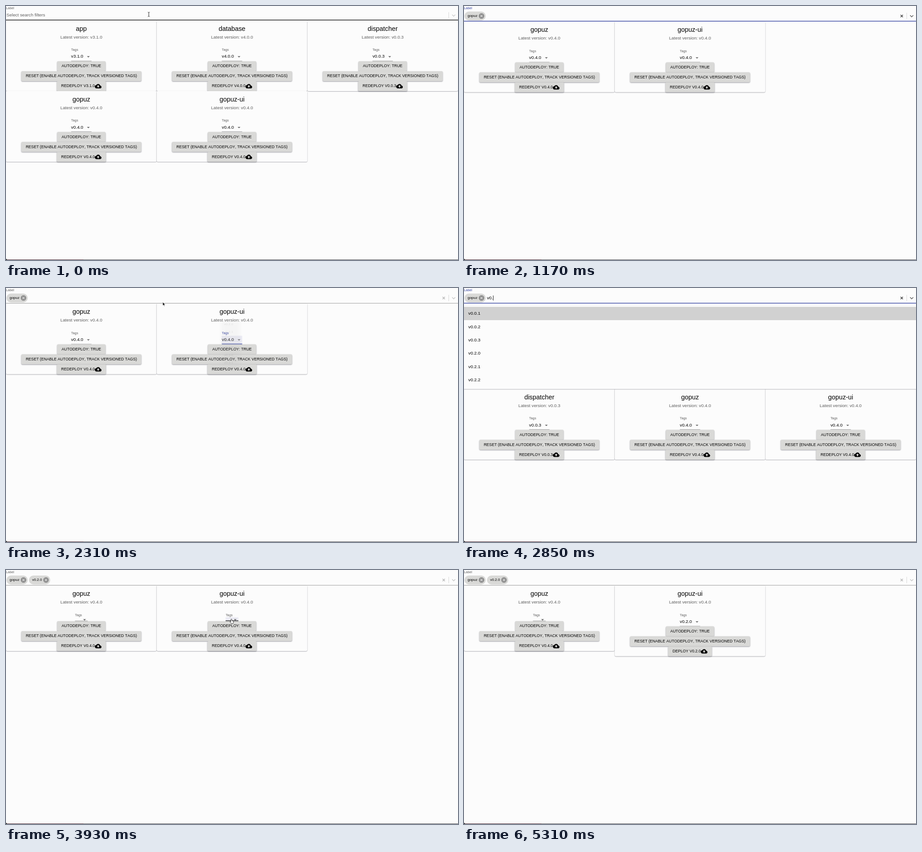
These frames come from a looping animation (998x561 px, 5.34 s). An HTML page with a canvas:

```html
<!DOCTYPE html>
<html lang="en">
<head>
<meta charset="utf-8">
<style>
html, body { margin: 0; width: 100%; height: 100%; overflow: hidden; background: #fcfcfc; }
canvas { display: block; }
</style>
</head>
<body>
<canvas id="stage" width="998" height="561"></canvas>
<script>
const ctx = document.getElementById('stage').getContext('2d');
const LOOP = 5340, COL = 998 / 3, ROW = 29.4;
const BG = '#fcfcfc', INK = '#000', GREY = '#5e5e5e', BLUE = '#303f9f', FILL = '#d9d9d7';
const cloud = new Path2D('M19.35 10.04C18.67 6.59 15.64 4 12 4 9.11 4 6.6 5.64 5.35 8.04 2.34 8.36 0 10.91 0 14c0 3.31 2.69 6 6 6h13c2.76 0 5-2.24 5-5 0-2.64-2.05-4.78-4.65-4.96zM14 13v4h-4v-4H7l5-5 5 5h-3z');

const tags = ['v0.2.0', 'v0.2.1', 'v0.4.0', 'v0.2.2', 'v0.3.0', 'v0.3.1'];
const services = [
  { name: 'app', latest: 'v3.1.0', tags: ['v3.1.0'] },
  { name: 'database', latest: 'v4.0.0', tags: ['v4.0.0'] },
  { name: 'dispatcher', latest: 'v0.0.3', tags: ['v0.0.1', 'v0.0.2', 'v0.0.3'] },
  { name: 'gopuz', latest: 'v0.4.0', tags },
  { name: 'gopuz-ui', latest: 'v0.4.0', tags }
];
const options = [...services.map(s => s.name), 'add-zt',
  'v0.0.1', 'v0.0.2', 'v0.0.3', 'v0.2.0', 'v0.2.1', 'v0.2.2', 'v0.3.0', 'v0.3.1', 'v0.4.0', 'v3.1.0', 'v4.0.0'];

// Pointer paths: [time, x, y]
const paths = [
  [[0, 315.3, 18.5], [540, 315.3, 18.5]],
  [[1440, 340, 60], [1680, 498, 113], [2190, 498, 113], [2310, 346.5, 31], [2400, 300, 22], [2580, 300, 22]],
  [[3570, 300, 22], [3810, 498, 109], [4380, 498, 109], [4650, 500, 117], [4980, 560, 200], [5190, 636, 260]]
];

const clamp = v => Math.max(0, Math.min(1, v));
const between = (t, a, b) => t >= a && t < b;
const fade = (t, inAt, outAt) => Math.min(clamp((t - inAt) / 90), clamp(1 - (t - outAt) / 100));
const typed = (t, word, times) => word.slice(0, times.filter(k => t >= k).length);

function setFont(size, kerning) {
  ctx.font = size + 'px "Liberation Sans", Helvetica, Arial, sans-serif';
  ctx.fontKerning = kerning;
}

function text(str, x, y, size, color = INK, align = 'left', kerning = 'normal') {
  setFont(size, kerning);
  ctx.textAlign = align;
  ctx.textBaseline = 'middle';
  ctx.fillStyle = color;
  ctx.fillText(str, x, y);
  return ctx.measureText(str).width;
}

function rect(x, y, w, h, color) {
  ctx.fillStyle = color;
  ctx.fillRect(x, y, w, h);
}

function panel(x, y, w, h, r, color, shade = 0, drop = 1, blur = 2.2) {
  ctx.save();
  if (shade) {
    ctx.shadowColor = `rgba(0,0,20,${shade})`;
    ctx.shadowBlur = blur;
    ctx.shadowOffsetY = drop;
  }
  ctx.fillStyle = color;
  ctx.beginPath();
  ctx.roundRect(x, y, w, h, r);
  ctx.fill();
  ctx.restore();
}

function line(points, color, width) {
  ctx.strokeStyle = color;
  ctx.lineWidth = width;
  ctx.beginPath();
  points.forEach(p => ctx.lineTo(...p));
  ctx.stroke();
}

function cross(x, y, r, color, width) {
  line([[x - r, y - r], [x + r, y + r]], color, width);
  line([[x - r, y + r], [x + r, y - r]], color, width);
}

function polygon(points, color, outline) {
  ctx.beginPath();
  points.forEach(p => ctx.lineTo(...p));
  ctx.closePath();
  ctx.fillStyle = color;
  ctx.fill();
  if (outline) {
    ctx.strokeStyle = outline;
    ctx.lineWidth = 0.8;
    ctx.stroke();
  }
}

function button(label, cx, y, icon) {
  setFont(8.65, 'none');
  const w = ctx.measureText(label).width + (icon ? 14.7 : 0) + 19.6, x = cx - w / 2;
  panel(x, y, w, 22, 2.4, FILL, 0.4);
  text(label, x + 9.8, y + 11, 8.65, INK, 'left', 'none');
  if (icon) {
    ctx.save();
    ctx.translate(x + w - 24.5, y + 3.6);
    ctx.scale(0.6125, 0.6125);
    ctx.fillStyle = '#000';
    ctx.fill(cloud);
    ctx.restore();
  }
}

function card(s, x, y, value, select) {
  const cx = x + COL / 2, w = value ? 45 : 28.2, left = cx - w / 2;
  const lift = value ? 0 : 11.5, base = y + 90.2 - lift, mid = y + 79.9 - lift * 0.4;
  panel(x + 0.1, y, COL - 0.2, 156.2 - lift, 2.4, BG, 0.4, 0.7, 1.6);
  text(s.name, cx, y + 19, 14.4, INK, 'center');
  text('Latest version: ' + s.latest, cx, y + 37.2, 9.75, GREY, 'center');
  if (select) panel(left, base - 19 + lift * 0.9, w, 19 - lift * 0.9, 1, '#ebebf4');
  text('Tags', left, y + 65.3, 7.35, select === 'focus' ? BLUE : GREY);
  if (value) text(value, left, mid, 9.8);
  const ax = left + w - 7, ay = mid - 1;
  polygon([[ax - 3.1, ay], [ax + 3.1, ay], [ax, ay + 3.1]], '#686868');
  const thick = select ? 1.4 : 0.8;
  rect(left, base - thick - 0.1, w, thick, select === 'focus' ? BLUE : select ? '#222' : '#8c8c8c');
  button('AUTODEPLOY: TRUE', cx, base);
  button('RESET (ENABLE AUTODEPLOY, TRACK VERSIONED TAGS)', cx, base + 22.1);
  const current = value || s.latest;
  button((current === s.latest ? 'REDEPLOY ' : 'DEPLOY ') + current.toUpperCase(), cx, base + 44.1, true);
}

function searchBar(s, lineY) {
  const mid = lineY - (s.chips.length ? 11.5 : 10.4);
  const strong = s.focus ? '#555' : '#c4c4c4';
  text('Label', 0, 4.7, 7.35, s.focus ? BLUE : GREY);
  let x = 1;
  for (const chip of s.chips) {
    panel(x, mid - 9.8, 47, 19.6, 9.8, FILL);
    text(chip, x + 7, mid + 0.2, 7.96);
    ctx.fillStyle = '#8e8e8e';
    ctx.beginPath();
    ctx.arc(x + 37.6, mid, 6.1, 0, 7);
    ctx.fill();
    cross(x + 37.6, mid, 2.4, '#e4e4e4', 1.1);
    x += 49.7;
  }
  let caret = x + 0.4;
  if (s.typed) caret += text(s.typed, x, mid, 9.8);
  else if (!s.chips.length) text('Select search filters', 1, mid, 9.8, GREY);
  if (s.caret) rect(caret, mid - 5.5, 0.9, 11, INK);
  if (s.chips.length) cross(966.5, mid, 2.6, s.focus ? '#444' : '#b8b8b8', 1.5);
  rect(977, mid - 7, 0.8, 14, '#cfcfcf');
  line([[985, mid - 1.6], [988.5, mid + 1.9], [992, mid - 1.6]], strong, 1.3);
  const bold = s.focus || s.hover;
  rect(0, lineY - (bold ? 0.8 : 0.2), 998, bold ? 1.4 : 0.8, s.focus ? BLUE : s.hover ? '#111' : '#858585');
}

function tagMenu(items, x, origin, selected, p) {
  if (p <= 0) return;
  const h = items.length * 28.2 + 9.8, top = origin - 4.9 - 28.2 * (selected + 0.5);
  ctx.save();
  ctx.globalAlpha = p;
  ctx.translate(x + 28, origin);
  ctx.scale(0.75 + 0.25 * p, 0.5625 + 0.4375 * p);
  ctx.translate(-x - 28, -origin);
  ctx.shadowColor = 'rgba(0,0,0,.35)';
  ctx.shadowBlur = 6;
  ctx.shadowOffsetY = 3;
  rect(x, top, 56, h, BG);
  ctx.shadowColor = 'transparent';
  items.forEach((item, i) => {
    const y = top + 4.9 + i * 28.2;
    if (i === selected) rect(x, y, 56, 28.2, '#dcdcdc');
    text(item, x + 9.8, y + 14.1, 9.8);
  });
  ctx.restore();
}

function pointer(t, menuOpen) {
  const path = paths.find(p => between(t, p[0][0], p[p.length - 1][0]));
  if (!path) return;
  const i = path.findIndex(k => k[0] > t), [t0, x0, y0] = path[i - 1], [t1, x1, y1] = path[i];
  const u = (t - t0) / (t1 - t0), x = x0 + (x1 - x0) * u, y = y0 + (y1 - y0) * u;
  const at = (...pts) => pts.map(([a, b]) => [x + a, y + b]);
  if (y < 30) {
    line(at([0, -4], [0, 4]), '#222', 1);
    for (const d of [-1, 1]) line(at([-2, d * 5], [0, d * 4], [2, d * 5]), '#222', 1);
  } else if (menuOpen || (between(x, 477, 522) && between(y, 104, 125))) {
    polygon(at([-1.5, 0], [-0.3, -0.8], [0.8, 0], [0.9, 3], [4, 4], [4.5, 5.5], [3.5, 9], [-1, 9], [-3.7, 5.2], [-2.6, 4.4], [-1.4, 5.2]), '#fff', '#111');
  } else {
    polygon(at([0, 0], [0, 8.2], [1.9, 6.5], [3.2, 9.3], [4.5, 8.7], [3.3, 6], [5.7, 5.9]), '#111', '#fff');
  }
}

function draw(t) {
  const s = {
    chips: t < 1050 ? [] : t < 3330 ? ['gopuz'] : ['gopuz', 'v0.2.0'],
    focus: between(t, 420, 1710) || between(t, 2400, 3840),
    hover: t < 420,
    typed: t < 1050 ? typed(t, 'gopuz', [690, 750, 810, 870, 930])
      : between(t, 2400, 3330) ? typed(t, 'v0.2.0', [2640, 2730, 2820, 2970, 3060, 3150]) : ''
  };
  s.caret = s.focus && (between(t, 420, 1020) || between(t, 2400, 3300));
  const open = between(t, 420, 1050) || between(t, 2400, 3330);
  const list = open ? options.filter(o => o.includes(s.typed) && !s.chips.includes(o)) : [];
  const lineY = s.chips.length ? 33.6 : 31.1;
  const menuTop = lineY + 5.5, menuH = Math.min(183.8, list.length * ROW + 4.9);
  const top = lineY + 0.7 + (open ? menuH + 4.9 : 0);

  const versionChip = s.chips[1];
  const has = (svc, q) => svc.name.includes(q) || svc.tags.some(v => v.includes(q));
  const shown = services.filter(svc => s.typed ? has(svc, s.typed) : s.chips.every(c => has(svc, c)));

  rect(0, 0, 998, 561, BG);
  shown.forEach((svc, i) => {
    const ui = svc.name === 'gopuz-ui';
    const value = !versionChip ? svc.latest : ui && t >= 4650 ? versionChip : '';
    const select = !ui ? '' : between(t, 1710, 2400) || between(t, 3960, 5100) ? 'focus'
      : between(t, 1665, 1710) || between(t, 3790, 3960) ? 'hover' : '';
    card(svc, (i % 3) * COL, top + Math.floor(i / 3) * 156.2, value, select);
  });

  if (open) {
    panel(0, menuTop, 998, menuH, 0, BG, 0.5, 0.8);
    ctx.save();
    ctx.beginPath();
    ctx.rect(0, menuTop, 998, menuH);
    ctx.clip();
    list.slice(0, 6).forEach((o, i) => {
      const y = menuTop + 2.5 + i * ROW;
      if (!i) rect(0, y, 998, ROW, '#d1d1d1');
      text(o, 9.5, y + ROW / 2 + 0.2, 9.8);
    });
    ctx.restore();
  }
  searchBar(s, lineY);

  const first = fade(t, 1740, 2220), second = fade(t, 3960, 4650);
  tagMenu(tags, 467.2, 114, 2, first);
  tagMenu(['v0.2.0'], 475.5, 111, 0, second);

  rect(0, 560, 998, 1, '#4c4c50');
  rect(0, 560, 171, 1, '#43232f');
  polygon([[0, 558], [0, 561], [3, 561]], '#111');
  pointer(t, first > 0.5 || second > 0.5);
}

const start = performance.now();
function tick() {
  draw((performance.now() - start) % LOOP);
  requestAnimationFrame(tick);
}
tick();
</script>
</body>
</html>
```
